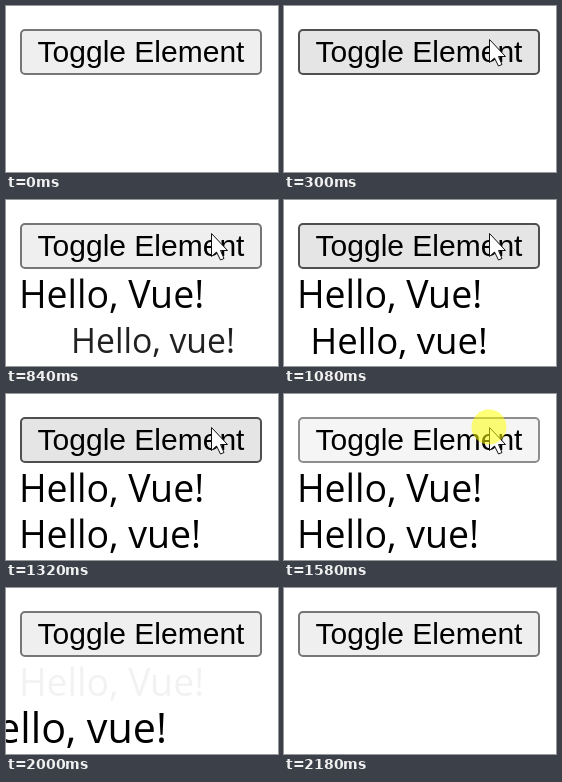
An HTML page with a canvas that plays this animation: 272x166 px, repeating every 2.8 s.

```html
<!DOCTYPE html>
<html lang="en">
<head>
<meta charset="utf-8">
<title>Toggle Element</title>
<style>
  html, body { margin: 0; width: 100%; height: 100%; overflow: hidden; background: #fff; }
  canvas { display: block; width: 272px; height: 166px; }
</style>
</head>
<body>
<canvas id="stage"></canvas>
<script>
const LOOP = 2800, STEP = 60, SHOW = 540, HIDE = 1580;
const W = 272, H = 166;
const canvas = document.getElementById('stage');
const ctx = canvas.getContext('2d');
const ratio = window.devicePixelRatio || 1;
canvas.width = W * ratio;
canvas.height = H * ratio;

const clamp = v => Math.min(1, Math.max(0, v));
const mix = (a, b, k) => a + (b - a) * k;

// CSS-style cubic-bezier timing, solved by bisection
function bezier(x1, y1, x2, y2) {
  const at = (a, b, u) => 3 * a * u * (1 - u) ** 2 + 3 * b * u * u * (1 - u) + u ** 3;
  return x => {
    if (x <= 0) return 0;
    if (x >= 1) return 1;
    let lo = 0, hi = 1;
    for (let i = 0; i < 24; i++) {
      const mid = (lo + hi) / 2;
      if (at(x1, x2, mid) < x) lo = mid; else hi = mid;
    }
    return at(y1, y2, lo);
  };
}
const ease = bezier(.25, .1, .25, 1);
const bounce = bezier(.215, .61, .355, 1);

// keys: [time, value] pairs, eased between neighbours
function keyed(keys, t, timing) {
  if (t <= keys[0][0]) return keys[0][1];
  for (let i = 1; i < keys.length; i++) {
    const [t0, a] = keys[i - 1], [t1, b] = keys[i];
    if (t < t1) return mix(a, b, timing((t - t0) / (t1 - t0)));
  }
  return keys[keys.length - 1][1];
}

const scaleIn = [[540, .3], [690, 1.1], [840, .9], [990, 1.03], [1140, .97], [1290, 1]];
const scaleOut = [[1640, 1], [1790, .9], [2000, 1.1], [2022, 1.1], [2360, .3]];

const STYLES = {
  normal: ['#efefef', '#767676'],
  hover: ['#e5e5e5', '#4f4f4f'],
  active: ['#f5f5f5', '#8d8d8d']
};

function isPressed(t) {
  return (t >= SHOW && t < 720) || (t >= HIDE && t < 1700);
}

function buttonState(t) {
  if (isPressed(t)) return 'active';
  if (t < 180 || (t >= 720 && t < 900) || t >= 1880) return 'normal';
  return 'hover';
}

function drawButton(t) {
  const [fill, border] = STYLES[buttonState(t)];
  ctx.beginPath();
  ctx.roundRect(15, 24, 240, 44, 4);
  ctx.fillStyle = fill;
  ctx.fill();
  ctx.lineWidth = 2;
  ctx.strokeStyle = border;
  ctx.stroke();
  ctx.fillStyle = '#000';
  ctx.font = '30px "Liberation Sans", Arial, sans-serif';
  ctx.textAlign = 'center';
  ctx.fillText('Toggle Element', 135, 56);
}

function drawMessage(text, baseline, alpha, scale = 1) {
  if (alpha <= 0) return;
  const originX = 535, originY = 142;
  ctx.save();
  ctx.globalAlpha = alpha;
  ctx.translate(originX, originY);
  ctx.scale(scale, scale);
  ctx.translate(-originX, -originY);
  ctx.fillStyle = '#000';
  ctx.font = '37.5px "Open Sans", "Noto Sans", sans-serif';
  ctx.textAlign = 'left';
  ctx.fillText(text, 12.9, baseline);
  ctx.restore();
}

function drawMessages(t) {
  if (t < SHOW || t >= 2180) return;
  const leaving = t >= HIDE;
  const fade = leaving ? 1 - ease((t - 1640) / 500) : ease((t - SHOW) / 360);
  drawMessage('Hello, Vue!', 108, fade);

  const scale = leaving ? keyed(scaleOut, t, ease) : keyed(scaleIn, t, bounce);
  const alpha = leaving ? 1 - ease((t - 2022) / 338) : ease((t - SHOW) / 520);
  drawMessage('Hello, vue!', 154, alpha, scale);
}

function cursorPosition(t) {
  if (t < 300) {
    const k = 1 - (1 - clamp((t - 20) / 280)) ** 2;
    return [mix(217, 205, k), mix(180, 33, k)];
  }
  const drop = .0046 * Math.max(0, t - 1730) ** 2;
  return [205 + drop * .184, 33 + drop];
}

function drawCursor(t) {
  if (t < 60 || t >= 1940) return;
  const [x, y] = cursorPosition(t);
  ctx.save();
  ctx.translate(x + .5, y + .5);
  ctx.beginPath();
  const outline = [[0, 0], [0, 23], [5, 18.5], [9, 26.5], [12.5, 25], [9, 17], [16, 17]];
  for (const [px, py] of outline) ctx.lineTo(px, py);
  ctx.closePath();
  ctx.fillStyle = '#fff';
  ctx.fill();
  ctx.lineWidth = 1;
  ctx.strokeStyle = '#111';
  ctx.stroke();
  ctx.restore();
}

function drawClick(t) {
  if (!isPressed(t)) return;
  ctx.beginPath();
  ctx.arc(205, 33, 17.5, 0, Math.PI * 2);
  ctx.fillStyle = 'rgba(255, 255, 0, .53)';
  ctx.fill();
}

function draw(t) {
  ctx.setTransform(ratio, 0, 0, ratio, 0, 0);
  ctx.fillStyle = '#fff';
  ctx.fillRect(0, 0, W, H);
  drawButton(t);
  drawMessages(t);
  drawCursor(t);
  drawClick(t);
}

// Each pose is held for one step; the second half is counted from its own click.
function held(t) {
  const base = t < HIDE ? 0 : HIDE;
  return base + Math.floor((t - base) / STEP) * STEP;
}

const start = performance.now();
function tick() {
  draw(held((performance.now() - start) % LOOP));
  requestAnimationFrame(tick);
}
tick();
</script>
</body>
</html>
```
